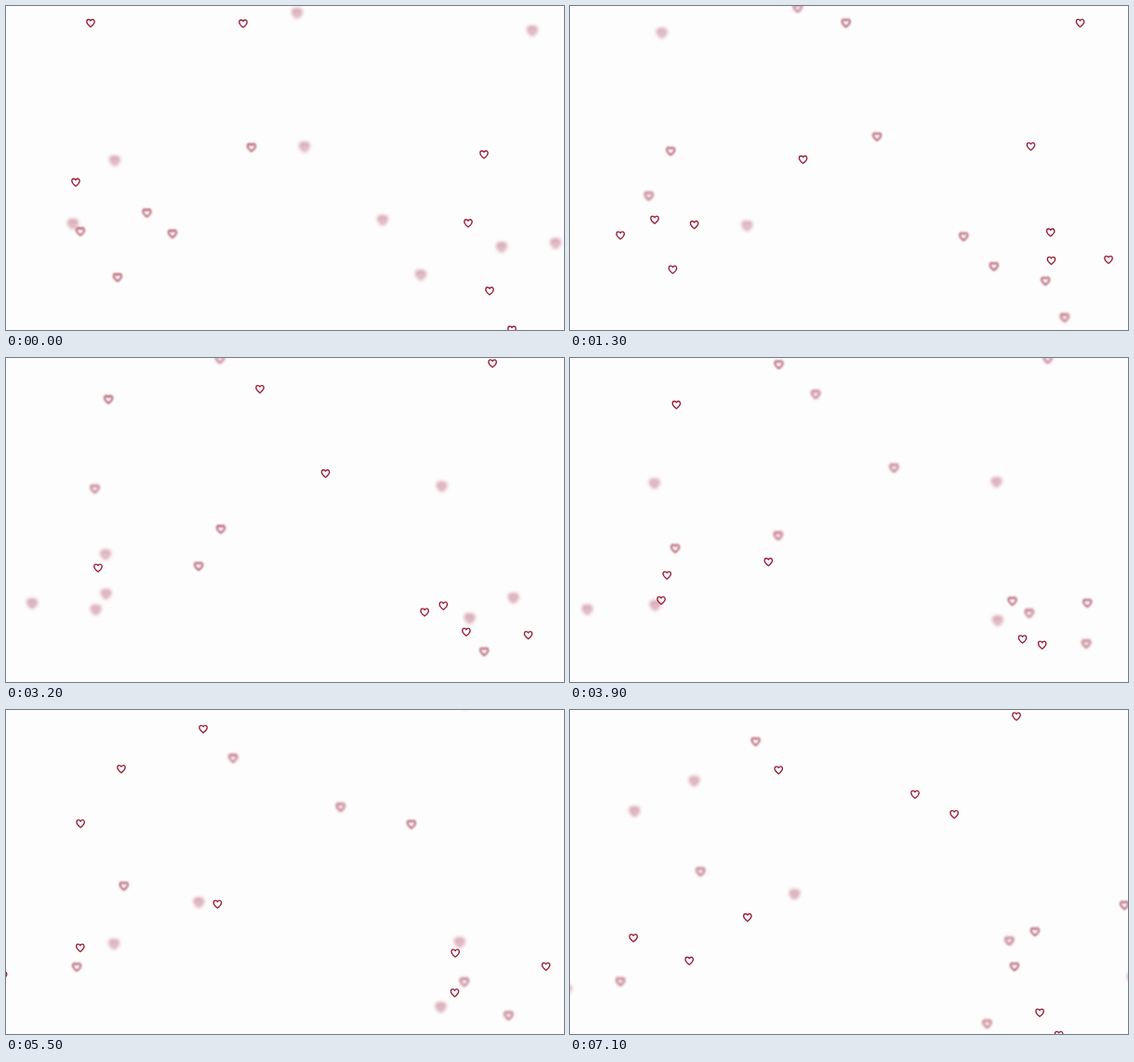
An HTML page without scripts that plays this animation: 600 px wide and 349 px high, repeating every 7200 ms.

```html
<!DOCTYPE html>
<html lang="en">
<head>
<meta charset="utf-8">
<title>Drifting hearts</title>
<style>
  /* Seconds since the loop began; every heart derives its pose from it. */
  @property --t {
    syntax: "<number>";
    inherits: true;
    initial-value: 0;
  }

  @keyframes clock {
    from { --t: 0; }
    to { --t: 7.2; }
  }

  html, body {
    margin: 0;
    width: 100%;
    height: 100%;
    overflow: hidden;
    background: #fefdfe;
  }

  svg {
    display: block;
    width: 600px;
    height: 349px;
    overflow: hidden;
    animation: clock 7.2s steps(72) infinite;
  }

  #heart {
    fill: none;
    stroke: #971b35;
    stroke-width: 1.3;
    stroke-linejoin: round;
  }

  /* x, y: start; u, v: speed per second; p: focus period; m: moment of sharpest focus */
  .heart {
    --left: calc(var(--x) + var(--u) * var(--t));
    --top: calc(var(--y) + var(--v) * var(--t));
    transform: translate(calc(1px * var(--left)), calc(1px * var(--top)));
    filter: blur(calc(1.1px * (1 - cos(1turn * (var(--t) - var(--m)) / var(--p)))));
  }

  /* Hearts that rebound from an edge */
  .rebound-top { --top: max(19 - 12.9 * var(--t), 8.4 * var(--t) - 25.6); }
  .rebound-corner {
    --left: max(566 - 13.4 * var(--t), 539 - 8.3 * var(--t));
    --top: max(27 - 6.6 * var(--t), 8.3 * var(--t) - 52);
  }
  .rebound-left { --left: max(72 - 13.7 * var(--t), 12.5 * var(--t) - 92.8); }
</style>
</head>
<body>
<svg viewBox="0 0 600 349">
  <defs>
    <path id="heart" d="M0 4.1C-1.2 3-4.2 1-4.2-1.5C-4.2-3.1-3.2-4-2.2-4C-1.2-4-.4-3.4 0-2.5C.4-3.4 1.2-4 2.2-4C3.2-4 4.2-3.1 4.2-1.5C4.2 1 1.2 3 0 4.1Z"/>
  </defs>
  <use class="heart" href="#heart" style="--x:91;--y:18.5;--u:6;--v:8.2;--p:5.6;--m:4.5"/>
  <use class="heart rebound-top" href="#heart" style="--x:255;--u:-7.8;--p:6.6;--m:5.6"/>
  <use class="heart" href="#heart" style="--x:313;--y:8;--u:-12.5;--v:8;--p:4.8;--m:2.3"/>
  <use class="heart rebound-corner" href="#heart" style="--p:5.4;--m:2.3"/>
  <use class="heart" href="#heart" style="--x:264;--y:152.5;--u:-10.3;--v:10;--p:6.7;--m:1.6"/>
  <use class="heart" href="#heart" style="--x:321;--y:152;--u:7.05;--v:-8.6;--p:4.8;--m:2.4"/>
  <use class="heart" href="#heart" style="--x:117;--y:167;--u:-6.7;--v:-8.1;--p:3.4;--m:2.1"/>
  <use class="heart" href="#heart" style="--x:75;--y:190;--u:7.5;--v:11.3;--p:3.7;--m:0"/>
  <use class="heart rebound-left" href="#heart" style="--y:235;--v:9.3;--p:3.9;--m:1.6"/>
  <use class="heart" href="#heart" style="--x:80;--y:243;--u:8.5;--v:-9.7;--p:3.8;--m:.9"/>
  <use class="heart" href="#heart" style="--x:151.5;--y:223;--u:-13.7;--v:9.8;--p:3.6;--m:1"/>
  <use class="heart" href="#heart" style="--x:179;--y:245.5;--u:8.8;--v:-6.6;--p:6;--m:4.7"/>
  <use class="heart" href="#heart" style="--x:120;--y:292.5;--u:-7.3;--v:-6.6;--p:5;--m:1.2"/>
  <use class="heart" href="#heart" style="--x:405;--y:231;--u:14.1;--v:13.4;--p:3.9;--m:2.4"/>
  <use class="heart" href="#heart" style="--x:446;--y:290;--u:7.6;--v:-7.2;--p:5.8;--m:2.6"/>
  <use class="heart" href="#heart" style="--x:497;--y:234;--u:15.2;--v:7.7;--p:4.3;--m:.7"/>
  <use class="heart" href="#heart" style="--x:533;--y:260;--u:-11.9;--v:11;--p:6.6;--m:2.6"/>
  <use class="heart" href="#heart" style="--x:591;--y:256;--u:-9.2;--v:13.3;--p:5;--m:2.2"/>
  <use class="heart" href="#heart" style="--x:514;--y:160;--u:-14.2;--v:-6.7;--p:7.2;--m:0"/>
  <use class="heart" href="#heart" style="--x:520;--y:307;--u:-6.7;--v:-8.2;--p:5.5;--m:0"/>
  <use class="heart" href="#heart" style="--x:544;--y:349;--u:-9.3;--v:-10.2;--p:4.1;--m:0"/>
  <use class="heart" href="#heart" style="--x:653;--y:253;--u:-8;--v:-6;--p:5;--m:5.7"/>
</svg>
</body>
</html>
```
